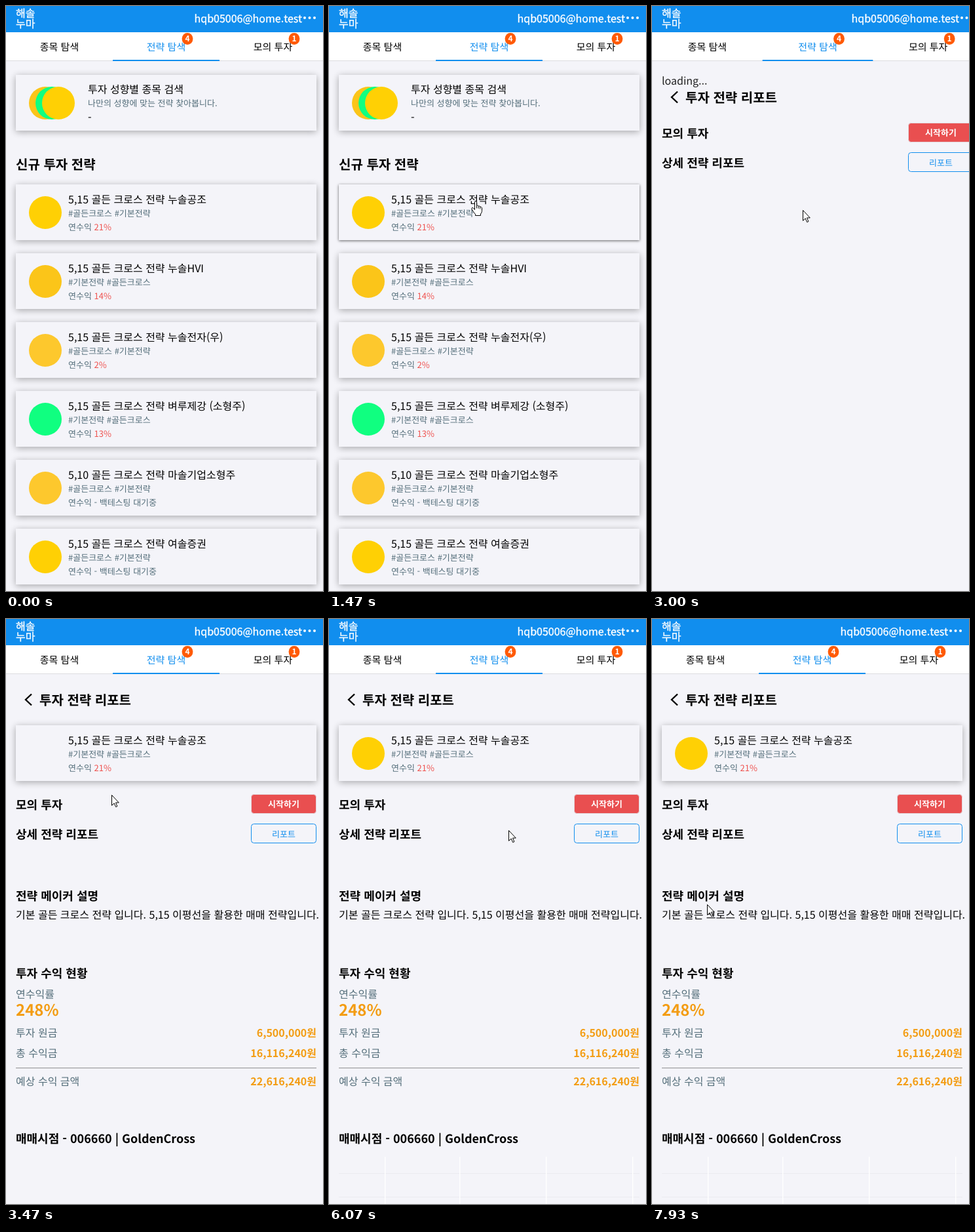
Animation, 484 px wide and 892 px high, one loop 8000 ms. Source, as an HTML page:

```html
<!DOCTYPE html>
<html lang="ko">
<head>
<meta charset="utf-8">
<title>투자 전략</title>
<style>
html, body { margin: 0; width: 100%; height: 100%; overflow: hidden; background: #f4f4f9; }
#stage { position: absolute; left: 0; top: 0; width: 484px; height: 892px; overflow: hidden; }
.view, .view > svg, #cursor { position: absolute; left: 0; top: 0; }
.view { width: 484px; height: 892px; background: #f4f4f9; }
.card { position: absolute; left: 15px; width: 459px; height: 85px; background: #f4f4f9; }
svg { overflow: hidden; }
text {
  font-family: "Noto Sans CJK KR", "Noto Sans KR", "Noto Sans CJK JP", "Noto Sans CJK", sans-serif;
  white-space: pre; text-rendering: geometricPrecision;
}
.bar { stroke: #fff; stroke-width: .35px; }
</style>
</head>
<body>
<div id="stage"></div>
<script>
const BLUE = '#118eee', GRAY = '#546e7a', RED = '#ef5350', ORANGE = '#f39c12';
const YELLOW = '#ffd004', AMBER = '#fbc519', HONEY = '#fdc82d', GREEN = '#10ff80';

const text = (x, y, size, str, fill = '#000', anchor = 'start', weight = 400) =>
  `<text x="${x}" y="${y}" font-size="${size}" fill="${fill}" text-anchor="${anchor}" font-weight="${weight}">${str}</text>`;
const bold = (x, y, size, str, fill, anchor) => text(x, y, size, str, fill, anchor, 700);
const rect = (x, y, w, h, fill, more = '') =>
  `<rect x="${x}" y="${y}" width="${w}" height="${h}" fill="${fill}" ${more}/>`;
const circle = (x, y, r, fill) => `<circle cx="${x}" cy="${y}" r="${r}" fill="${fill}"/>`;
const card = y => `<div class="card" data-y="${y}" style="top:${y}px"></div>`;

// Top bar and tabs for a page of the given width
function header(w) {
  const tab = w / 3, mid = i => tab * (i + 0.5);
  const badge = (i, n) => rect(mid(i) + 24.2, 41, 16.6, 18, '#ff5a05', 'rx="8.3"') +
    bold(mid(i) + 32.5, 54.4, 12, n, '#fff', 'middle');
  return rect(0, 0, 484, 40, BLUE) + '<g class="bar">' +
    text(15, 17, 16, '해솔', '#fff') + text(15, 33, 16, '누마', '#fff') +
    text(w - 37, 25, 16, 'hqb05006@home.test', '#fff', 'end') + '</g>' +
    [33, 25.5, 18].map(d => circle(w - d, 18, 2, '#fff')).join('') +
    rect(0, 40, 484, 43, '#fff') + rect(0, 83, 484, 1, '#dcdcdf') +
    rect(tab, 82, tab, 2, BLUE) +
    ['종목 탐색', '전략 탐색', '모의 투자'].map((s, i) =>
      text(mid(i), 68, 15, s, i == 1 ? BLUE : '#000', 'middle')).join('') +
    badge(1, '4') + badge(2, '1');
}

const entry = (y, title, tags, rate) =>
  text(95, y + 29, 16, title) + text(95, y + 49, 13, tags, GRAY) +
  text(95, y + 70, 13, '연수익 ' + (rate ? `<tspan fill="${RED}">${rate}</tspan>` : '- 백테스팅 대기중'), GRAY);

const AB = '#골든크로스 #기본전략', BA = '#기본전략 #골든크로스';
const items = [
  ['5,15 골든 크로스 전략 누솔공조', AB, '21%', YELLOW],
  ['5,15 골든 크로스 전략 누솔HVI', BA, '14%', AMBER],
  ['5,15 골든 크로스 전략 누솔전자(우)', AB, '2%', HONEY],
  ['5,15 골든 크로스 전략 벼루제강 (소형주)', BA, '13%', GREEN],
  ['5,10 골든 크로스 전략 마솔기업소형주', AB, '', HONEY],
  ['5,15 골든 크로스 전략 여솔증권', AB, '', YELLOW]
];
const rowY = i => 272 + 105 * i;

const listArt = () => header(489) +
  circle(60, 148, 25, AMBER) + circle(70, 148, 25, GREEN) + circle(80, 148, 25, YELLOW) +
  text(125, 133, 16, '투자 성향별 종목 검색') +
  text(125, 153, 13, '나만의 성향에 맞는 전략 찾아봅니다.', GRAY) +
  text(125, 176, 16, '-') +
  bold(15, 249, 20, '신규 투자 전략') +
  items.map(([title, tags, rate, color], i) =>
    circle(60, rowY(i) + 43, 25, color) + entry(rowY(i), title, tags, rate)).join('');

const heading = y =>
  `<path d="M39 ${y - 16.5}l-9 8.5 9 8.5" fill="none" stroke="#000" stroke-width="2.4"/>` +
  bold(51, y, 20, '투자 전략 리포트');

// Two action rows; x is the left edge of the buttons
const actions = (x, y) =>
  bold(15, y + 23, 18, '모의 투자') + bold(15, y + 68, 18, '상세 전략 리포트') +
  rect(x + .5, y + .5, 99, 29, '#e94f50', 'rx="4" stroke="#e3d5da"') +
  bold(x + 50, y + 20, 13, '시작하기', '#fff', 'middle') +
  rect(x + .5, y + 45.5, 99, 29, 'none', `rx="4" stroke="${BLUE}"`) +
  text(x + 50, y + 66, 13, '리포트', BLUE, 'middle');

const loadingArt = () => header(506) + text(15, 120, 16, 'loading...', '#222') +
  heading(147) + actions(391, 178);

const amount = (y, label, value) =>
  text(15, y, 16, label, GRAY) + bold(474, y, 16, value, ORANGE, 'end');

const reportArt = () => header(489) + heading(131) +
  entry(162, items[0][0], BA, '21%') + actions(374, 267) +
  bold(15, 429, 18, '전략 메이커 설명') +
  text(15, 457, 16, '기본 골든 크로스 전략 입니다. 5,15 이평선을 활용한 매매 전략입니다.') +
  bold(15, 547, 18, '투자 수익 현황') +
  text(15, 578, 16, '연수익률', GRAY) + bold(15, 605, 24, '248%', ORANGE) +
  amount(637, '투자 원금', '6,500,000원') +
  amount(668, '총 수익금', '16,116,240원') +
  rect(15, 684, 459, 1, '#9a9a9d') + rect(15, 685, 459, 1, '#e6e6ea') +
  amount(711, '예상 수익 금액', '22,616,240원') +
  bold(15, 799, 18, '매매시점 - 006660 | GoldenCross') +
  '<g id="late">' + circle(60, 205, 25, YELLOW) +
  [845, 881].map(y => rect(15, y, 459, 1, '#ebebf0')).join('') +
  [85, 199, 331, 463].map(x => rect(x, 820, 1.4, 72, '#fff')).join('') + '</g>';

const view = (id, cards, art) => `<div class="view" id="${id}">${cards.map(card).join('')}` +
  `<svg width="484" height="892">${art}</svg></div>`;

const $ = id => document.getElementById(id);
$('stage').innerHTML =
  view('list', [105, ...items.map((_, i) => rowY(i))], listArt()) +
  view('loading', [], loadingArt()) +
  view('report', [162], reportArt()) +
  `<svg id="cursor" width="20" height="25" stroke="#000" fill="#fff">
    <path id="arrow" d="M.5 .5V16.3L4.2 12.9 6.7 18.6 8.9 17.6 6.5 12H11.3Z"/>
    <path id="hand" d="M5.5 13.5V2Q5.5 .5 7 .5T8.5 2V7.5Q9 6.5 10 7T11.2 8.3Q12 7.6 13 8.2T13.8 9.5Q14.6 8.8 15.5 9.5T16.5 11V15.5Q16.5 18 14.5 20V22.5H6.5V20.5Q3.5 17.5 1 12.8Q.3 11 1.8 10.6T5.5 13.5M8.5 7.5v4M11.2 8.3v3.5M13.8 9.5v3"/>
  </svg>`;

const LOOP = 8000, STEP = 200 / 3, FADE = 300;
const OPEN = 3000, LOADED = 3200, LATE = 3600;

// Pointer path: time, x, y
const path = [
  [530, 471, 691], [870, 400, 520], [1133, 262, 300], [1200, 240, 278], [1333, 226, 294],
  [1466, 224, 297], [1667, 101, 286], [1867, 140, 340], [2133, 230, 311], [3000, 230, 311],
  [3466, 161, 268], [3667, 160, 267], [3800, 160, 267], [3933, 158, 260], [4300, 270, 282],
  [4600, 355, 299], [5000, 355, 299], [5267, 304, 373], [5733, 304, 373], [5933, 298, 383],
  [6200, 250, 262], [6400, 205, 212], [6600, 197, 236], [6733, 198, 257], [7133, 181, 272],
  [7200, 181, 272], [7467, 110, 330], [7667, 30, 415], [7933, 84, 435], [8000, 84, 435]
];

function pointer(t) {
  const i = path.findIndex(p => p[0] > t);
  if (i < 1) return null;
  const [a, b] = [path[i - 1], path[i]], k = (t - a[0]) / (b[0] - a[0]);
  return [a[1] + (b[1] - a[1]) * k, a[2] + (b[2] - a[2]) * k];
}
const inside = (p, y) => p && p[0] >= 15 && p[0] < 474 && p[1] >= y && p[1] < y + 85;

// Hover strength of a card, fading in and out over FADE
function hover(t, y) {
  let h = 0;
  for (let s = t - 800; s <= t; s += 20)
    h = Math.min(1, Math.max(0, h + (inside(pointer(s), y) ? 20 : -20) / FADE));
  return h;
}

function draw(now) {
  const t = now % LOOP, q = Math.floor((t + 5) / STEP) * STEP;
  const name = t < OPEN ? 'list' : t < LOADED ? 'loading' : 'report';
  for (const id of ['list', 'loading', 'report'])
    $(id).style.display = id == name ? 'block' : 'none';
  $('late').style.display = t < LATE ? 'none' : 'inline';

  const p = pointer(q + 0.5);
  let link = false;
  for (const c of $(name).querySelectorAll('.card')) {
    const y = +c.dataset.y, h = hover(q, y);
    link = link || inside(p, y);
    c.style.boxShadow = `0 ${2 - h}px ${10 - 6 * h}px rgba(0,0,0,${0.32 + 0.28 * h})`;
  }
  $('cursor').style.display = p ? 'block' : 'none';
  if (p) {
    $('cursor').style.transform = `translate(${Math.round(p[0]) - (link ? 6 : 0)}px,${Math.round(p[1])}px)`;
    $('hand').style.display = link ? 'inline' : 'none';
    $('arrow').style.display = link ? 'none' : 'inline';
  }
}

const start = performance.now();
function tick() {
  draw(performance.now() - start);
  requestAnimationFrame(tick);
}
tick();
</script>
</body>
</html>
```
